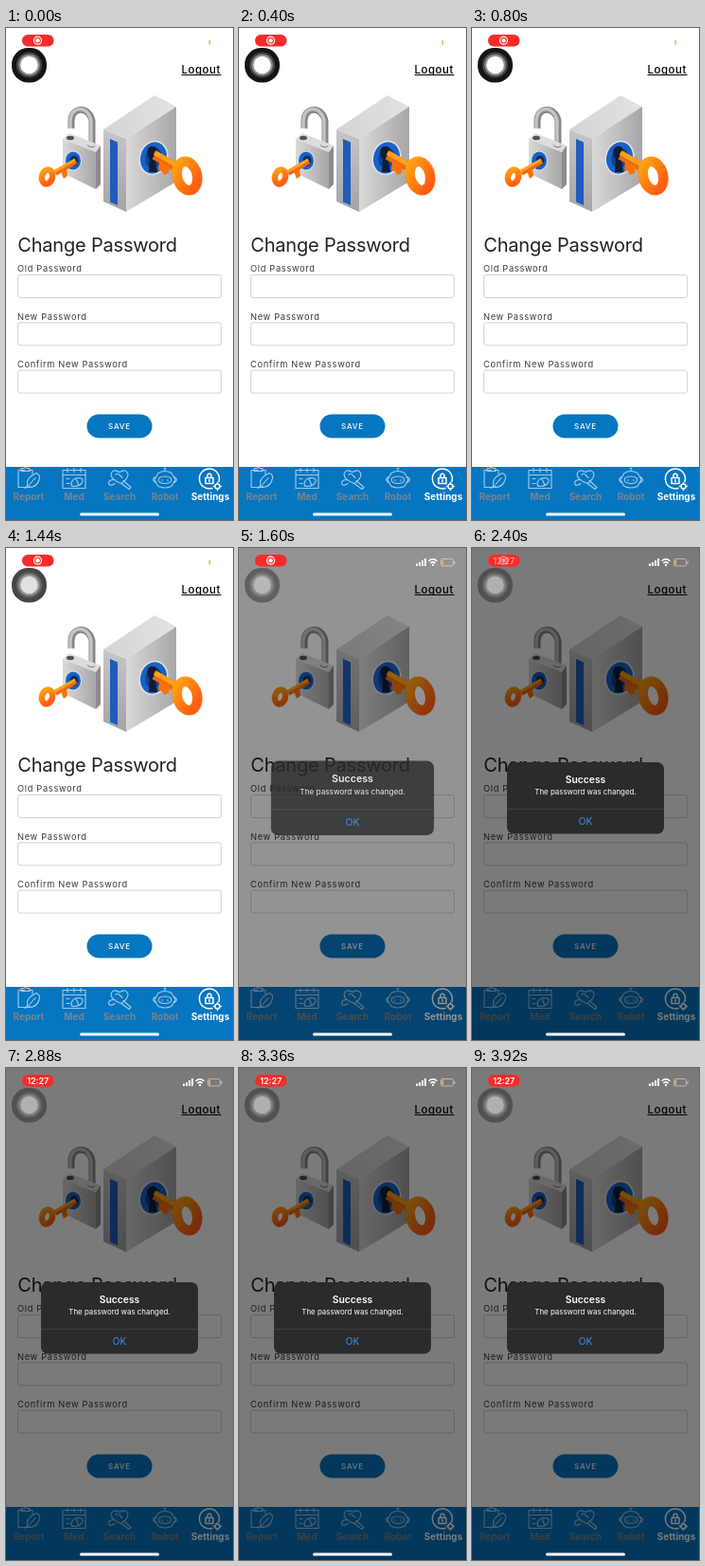
Animation of 240x519 px, one loop 4000 ms. Source, as an HTML page:

```html
<!DOCTYPE html>
<html lang="en">
<head>
<meta charset="utf-8">
<title>Change Password</title>
<style>
  html, body { margin: 0; height: 100%; overflow: hidden; background: #fff; }
  svg { display: block; width: 100vw; height: 100vh; font-family: Inter, sans-serif; }
  .label { font-size: 9.3px; letter-spacing: .67px; fill: #3c3c3c; }
  .field { fill: #fff; stroke: #d3d3d3; }
  .tabs text { font-size: 10px; font-weight: 700; text-anchor: middle; fill: #7c848a; }
  .icon { fill: none; stroke: #a3cbe8; stroke-width: 1.1; stroke-linecap: round; stroke-linejoin: round; }
  .tabs .active { fill: #fff; }
  .icon.on { stroke: #fff; stroke-width: 1.5; }
  #alert text { text-anchor: middle; fill: #fff; }
</style>
</head>
<body>
<svg viewBox="0 0 240 519" preserveAspectRatio="none">
  <defs>
    <linearGradient id="steel"><stop stop-color="#d9d9d9"/><stop offset="1" stop-color="#a6a6a7"/></linearGradient>
    <linearGradient id="side" x2="0" y2="1"><stop stop-color="#c6c6c8"/><stop offset="1" stop-color="#a3a4a6"/></linearGradient>
    <linearGradient id="top"><stop stop-color="#d4d4d5"/><stop offset="1" stop-color="#e2e2e2"/></linearGradient>
    <linearGradient id="gold" x2=".6" y2="1"><stop stop-color="#ffa414"/><stop offset="1" stop-color="#ff5f12"/></linearGradient>
  </defs>

  <rect width="240" height="519" fill="#fff"/>
  <text x="185.500" y="47.500" font-size="11.500" font-weight="500" letter-spacing=".5">Logout</text>
  <path d="M185.500 49.500h42" stroke="#000"/>

  <!-- open padlock -->
  <path d="M69 106V98C69 83 88 82 91 98V124" fill="none" stroke="#85878a" stroke-width="7"/>
  <path d="M68 106V98C68 82 87 81 90 98V123" fill="none" stroke="#c3c4c6" stroke-width="3.500"/>
  <path d="M60 117L67 111 100 124 95 131Z" fill="#dcdcdd"/>
  <path d="M60 117L95 131V170L60 153Z" fill="url(#steel)"/>
  <path d="M95 131L100 124V165L95 170Z" fill="#8a8c8f"/>
  <ellipse cx="68" cy="116" rx="4" ry="2.200" fill="#505255"/>
  <path d="M86 123.500q4 4 8 1" stroke="#77797c" fill="none"/>
  <ellipse cx="71" cy="140" rx="9" ry="10.500" fill="#dedfe0"/>
  <ellipse cx="71" cy="140" rx="8" ry="9.500" fill="#1762c4"/>
  <ellipse cx="72" cy="140" rx="4.500" ry="5.500" fill="#0c2f68"/>
  <path d="M52 153L74 140.500" stroke="#f0690c" stroke-width="6"/>
  <path d="M51 151.500L73 139" stroke="#ffa51c" stroke-width="3"/>
  <path d="M58 151l3 8 4-3-1-7" fill="#f9700e"/>
  <ellipse cx="43.500" cy="157" rx="5.500" ry="7.500" transform="rotate(15 43.500 157)" fill="none" stroke="url(#gold)" stroke-width="6.500"/>

  <!-- safe -->
  <path d="M103 107L157 71 180 83 127 117Z" fill="url(#top)"/>
  <path d="M103 107L127 117V194L103 183Z" fill="url(#side)"/>
  <path d="M127 117L180 83V162L127 194Z" fill="url(#steel)"/>
  <path d="M110 117L118 120.500V187L110 183.500Z" fill="#1f5cbb"/>
  <g transform="rotate(15 156 137)">
    <ellipse cx="156" cy="137" rx="15.500" ry="18.500" fill="#dfe0e1"/>
    <ellipse cx="156" cy="137" rx="13.800" ry="16.800" fill="#1762c6"/>
    <ellipse cx="156" cy="137" rx="8.500" ry="11" fill="#0e4190"/>
  </g>
  <path d="M151 126q9-4 9 6l-3 5 3 15h-9l1-14q-5-7-1-12" fill="#101c34"/>
  <path d="M157 134L181 147.500" stroke="#f0690a" stroke-width="10"/>
  <path d="M157 131.500L181 145" stroke="#ffa01a" stroke-width="5"/>
  <path d="M162 140l-1 10 4 1 2 4 5-2 1-7" fill="#f9700e"/>
  <ellipse cx="191.500" cy="156" rx="10.500" ry="15.500" transform="rotate(-14 191.500 156)" fill="none" stroke="url(#gold)" stroke-width="10.500"/>

  <text x="12.300" y="236" font-size="20" letter-spacing="-.2" fill="#222">Change Password</text>
  <g id="form"></g>
  <rect x="85.500" y="407.500" width="69" height="25" rx="12.500" fill="#0776c1"/>
  <text x="108" y="423.300" font-size="8" font-weight="500" letter-spacing=".8" fill="#fff">SAVE</text>

  <rect y="463" width="240" height="56" fill="#0776c1"/>
  <g class="tabs" id="tabs"></g>

  <rect id="dim" width="240" height="519"/>
  <rect x="78" y="511.500" width="84" height="3" rx="1.500" fill="#fff"/>

  <g id="alert">
    <rect x="37" y="226" width="166" height="75.500" rx="7" fill="#2a2b2c"/>
    <path d="M37 275.500H203" stroke="#4b4c4e" stroke-width=".7"/>
    <text x="120" y="247.500" font-size="10.300" font-weight="600">Success</text>
    <text x="120" y="260.300" font-size="7.900">The password was changed.</text>
    <text x="120" y="292" font-size="10" style="fill:#3a92ee">OK</text>
  </g>

  <!-- status bar -->
  <rect x="17" y="7" width="33.500" height="12.500" rx="6" fill="#f52c2a"/>
  <g id="record" fill="#fff"><circle cx="33.500" cy="13.200" r="4" fill="none" stroke="#fff" stroke-width="1.200"/><circle cx="33.500" cy="13.200" r="2.200"/></g>
  <text id="clock" x="33.700" y="16.500" font-size="9" font-weight="600" text-anchor="middle" fill="#fff">12:27</text>
  <path d="M187 16.500h2v2.500h-2zM190 15h2v4h-2zM193 13h2v6h-2zM196 11h2v8h-2z" fill="#fff"/>
  <path d="M200.500 13.800q4.500-4 9 0M202.300 16q2.700-2.300 5.400 0" fill="none" stroke="#fff" stroke-width="1.500"/>
  <circle cx="205" cy="18" r="1.200" fill="#fff"/>
  <rect x="213.500" y="11.500" width="13" height="7.500" rx="2" fill="none" stroke="#fff" stroke-opacity=".6" stroke-width=".8"/>
  <path d="M228 13.800v3" stroke="#fff" stroke-opacity=".6"/>
  <rect x="214.500" y="12.500" width="1.600" height="5.500" rx=".8" fill="#f0b560"/>

  <!-- floating touch button -->
  <rect id="touchBase" x="6" y="21" width="37" height="36.500" rx="17.500" fill="#141414"/>
  <g id="touchRings" fill="#fff">
    <circle cx="24.500" cy="39" r="13.600" opacity=".2"/>
    <circle cx="24.500" cy="39" r="11.300" opacity=".4"/>
    <circle cx="24.500" cy="39" r="9.200"/>
  </g>
</svg>
<script>
const $ = id => document.getElementById(id);

$('form').innerHTML = ['Old Password', 'New Password', 'Confirm New Password'].map((name, i) => {
  const y = 257.3 + i * 50.3;
  return `<text class="label" x="12" y="${y}">${name}</text>
    <rect class="field" x="12.5" y="${y + 3.2}" width="215" height="24" rx="2.5"/>`;
}).join('');

// Icon paths are relative to the tab's centre.
const tabs = [
  ['Report', 'M-4-9H-11V9H2M-8-8v-3h3q1-2 3 0h3v3ZM0-9H4V-5M-1 7Q-3 1 3-3L8-6Q13-4 11 1 9 8 2 9ZM-1 7L-4 10M1 6L7-1'],
  ['Med', 'M-12-9H12V10H-12ZM-12-4H12M-7-11v4M0-11v4M7-11v4M-8 0h3M-8 5h3M-3 6Q-3 0 4-1 10-1 9 3 7 8 0 8-3 8-3 6M2 0L5 7'],
  ['Search', 'M2 5Q-9 1-9-5-7-11 0-7 7-11 9-5 9 0 2 5M-5 1Q-13 1-11 6-9 8-5 5M4 2L12 9 10 11 2 5M-4-4Q-3-7 0-4L3-1'],
  ['Robot', 'M-7-6Q0-10 7-6L11 1 7 8Q0 11-7 8L-11 1ZM0-8v-2M-1-11h2M-10-2q-5 3 0 6M10-2q5 3 0 6M-6-1Q0-4 6-1 8 2 5 4 0 6-5 4-8 2-6-1M-3 1v1M3 1v1'],
  ['Settings', 'M3 10A10.500 10.500 0 1 1 10 3M-4-1H4V5H-4ZM-2-1V-4Q0-7 2-4V-1M0 1v2M6 8a2.500 2.500 0 1 0 5 0a2.500 2.500 0 1 0-5 0M8.500 4v1M8.500 11v1M4.500 8h1M11.500 8h1'],
];
$('tabs').innerHTML = tabs.map(([name, path], i) => {
  const x = 24 + i * 48, on = i === 4;
  return `<path class="icon ${on ? 'on' : ''}" transform="translate(${x - (on ? 1 : 0)} 475.5)" d="${path}"/>
    <text class="${on ? 'active' : ''}" x="${x}" y="498">${name}</text>`;
}).join('');

const clamp = v => Math.max(0, Math.min(1, v));
const fade = (id, opacity) => $(id).setAttribute('opacity', opacity);

function draw(now) {
  const t = Math.floor(now % 4000 / 80) * 80;

  // Critically damped spring for the alert and its backdrop.
  const s = Math.max(0, t - 1460) * 0.022;
  const shown = 1 - (1 + s) * Math.exp(-s);
  const scale = 1.2 - 0.2 * shown;
  fade('dim', 0.52 * shown);
  fade('alert', shown);
  $('alert').setAttribute('transform', `translate(120 263.7) scale(${scale}) translate(-120 -263.7)`);

  const released = clamp((t - 1350) / 250);
  fade('touchBase', 1 - 0.6 * released);
  fade('touchRings', 1 - 0.45 * released);

  const clock = clamp((t - 2320) / 160);
  fade('clock', clock);
  fade('record', 1 - clock);
  requestAnimationFrame(() => draw(performance.now()));
}
draw(0);
</script>
</body>
</html>
```
